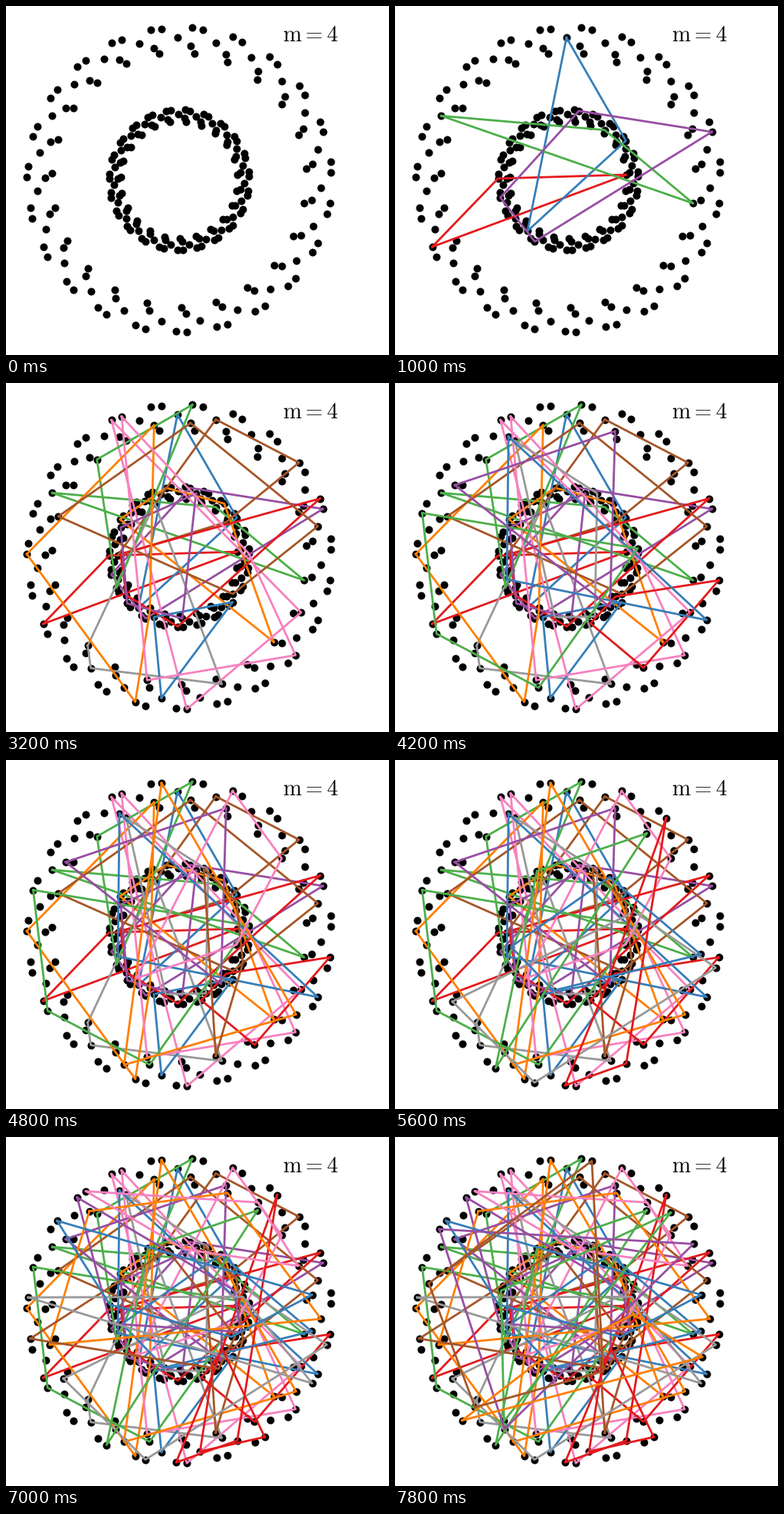
Animation, 500 px wide and 455 px high, one loop 8 s. Source, as a matplotlib script:

```python
import numpy as np
import matplotlib.pyplot as plt
from matplotlib.animation import FuncAnimation

W, H, DPI = 500, 455, 100
CX, CY = 226.0, 226.6
SECTORS = 23
INNER = 0.46

# Five slots per sector: radius in pixels and angle in degrees
RADII = [198.9, 197.8, 185.4, 175.0, 166.2]
ANGLES = [6.8, 2.75, -3.25, 6.85, 5.0]

COLORS = ["#e41a1c", "#377eb8", "#4daf4a", "#984ea3",
          "#ff7f00", "#a65628", "#f781bf", "#999999"]

# Vertex id = 10 * sector + slot; slots 5 to 9 lie on the inner ring
CYCLES = [
    (131, 115, 9), (62, 26, 157), (102, 38, 15, 224), (11, 56, 125, 155),
    (204, 95, 65, 36), (52, 20, 29, 118), (70, 213, 170), (144, 152, 183, 79),
    (10, 119, 147, 176), (172, 167, 205), (50, 84, 136), (57, 107, 146, 178),
    (110, 63, 158, 161), (53, 12, 217, 104), (71, 6, 200, 164), (74, 46, 197, 168),
    (220, 208, 185, 193), (73, 137, 210), (100, 5, 163, 130), (93, 43, 207),
    (61, 212, 162), (184, 45, 27, 215), (40, 24, 229, 148), (133, 160, 221, 16),
    (31, 192, 171, 196), (223, 35, 129, 169), (34, 150, 75), (80, 19, 227, 126),
    (83, 44, 2, 123), (121, 68, 218, 195), (81, 33, 14, 58), (111, 17, 211),
    (190, 182, 198, 209), (91, 3, 219, 116), (32, 154, 105), (90, 22, 153),
    (140, 222, 7, 159), (112, 51, 196, 143),
]


def vertex(v):
    sector, slot = divmod(v, 10)
    ring, kind = divmod(slot, 5)
    r = RADII[kind] * (INNER if ring else 1)
    t = np.radians(ANGLES[kind] + 360 * sector / SECTORS)
    return CX + r * np.cos(t), CY - r * np.sin(t)


plt.rcParams["mathtext.fontset"] = "cm"
fig = plt.figure(figsize=(W / DPI, H / DPI), dpi=DPI, facecolor="white")
ax = fig.add_axes([0, 0, 1, 1])
ax.set_xlim(0, W)
ax.set_ylim(H, 0)
ax.axis("off")

dots = np.array([vertex(v) for v in range(10 * SECTORS)])
ax.plot(dots[:, 0], dots[:, 1], "o", color="black", ms=6.2, mew=1, zorder=1)
ax.text(361, 46, r"$\mathrm{m} = 4$", fontsize=21, va="baseline")

loops = []
for i, cycle in enumerate(CYCLES):
    pts = np.array([vertex(v) for v in cycle + cycle[:1]])
    line, = ax.plot(pts[:, 0], pts[:, 1], color=COLORS[i % len(COLORS)],
                    lw=2, solid_joinstyle="round", zorder=2, visible=False)
    loops.append(line)


def update(frame):
    for i, line in enumerate(loops):
        line.set_visible(i < frame - 1)
    return loops


anim = FuncAnimation(fig, update, frames=len(CYCLES) + 2, interval=200,
                     repeat=True, repeat_delay=0)
plt.show()
```
